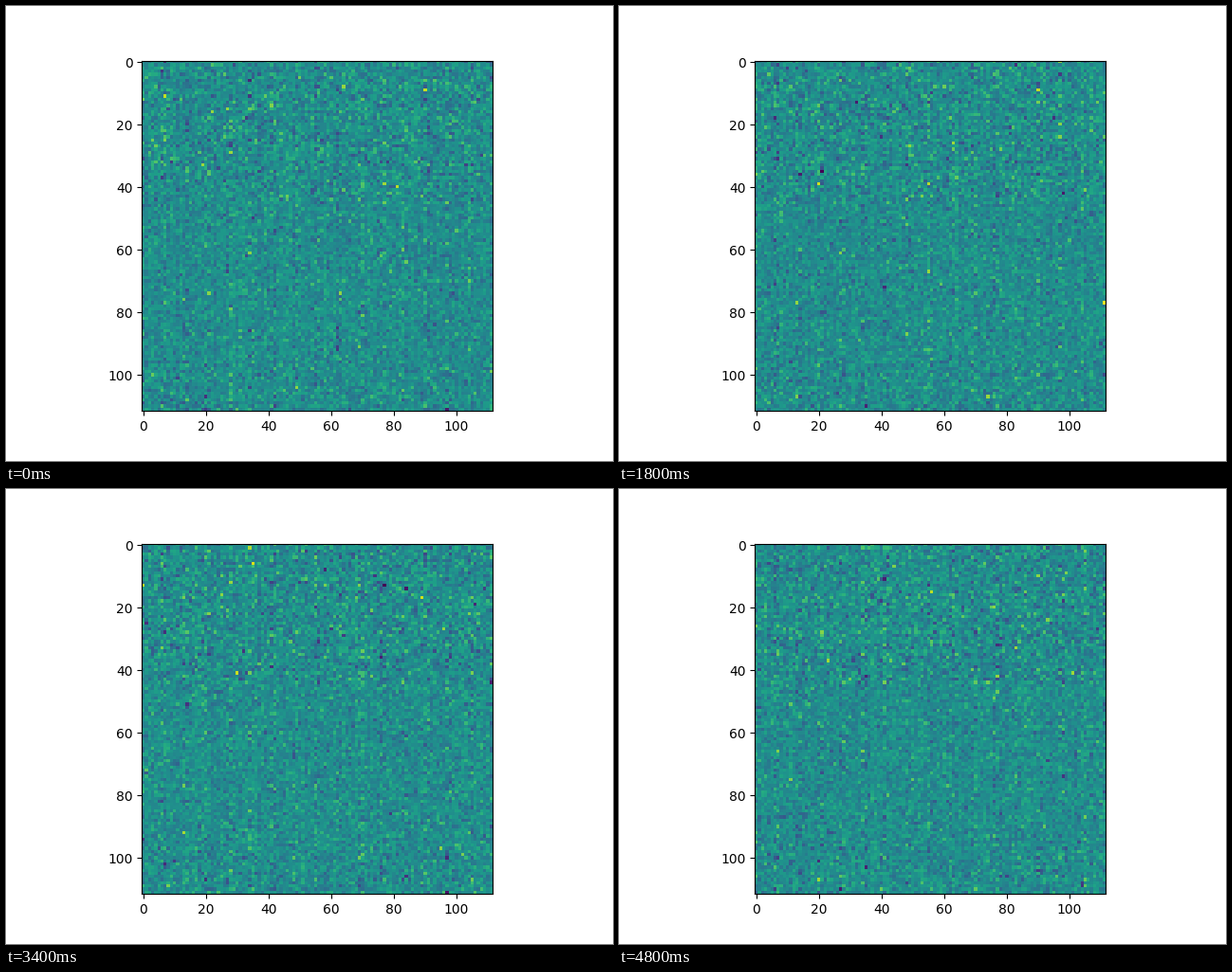
A matplotlib script for the animation above (4.9 s loop, 640x480 px).

```python
import numpy as np
import matplotlib.pyplot as plt
from matplotlib.animation import FuncAnimation

SIZE = 112
FRAMES = 49
INTERVAL = 100
MEAN = 0.49


def noise_scale():
    """Spread of each cell: stronger near the top and on every seventh column."""
    rng = np.random.default_rng(7)
    idx = np.arange(SIZE)
    rows = np.where(idx < 45, 1.17, 0.92)
    rows[idx >= 96] = 1.02
    cols = np.where(np.isin(idx % 7, (0, 6)), 1.27, 0.95)
    cells = rng.lognormal(0, 0.22, (SIZE, SIZE))
    return 0.074 * rows[:, None] * cols * cells


SCALE = noise_scale()


def field(i):
    rng = np.random.default_rng(1000 + i)
    streaks = rng.normal(0, 0.014, SIZE)
    grid = MEAN + streaks + SCALE * rng.normal(size=(SIZE, SIZE))
    return np.clip(grid, 0, 1)


fig, ax = plt.subplots(figsize=(6.4, 4.8), dpi=100)
image = ax.imshow(field(0), cmap="viridis", vmin=0, vmax=1,
                  interpolation="nearest")


def update(i):
    image.set_data(field(i))
    return [image]


anim = FuncAnimation(fig, update, frames=FRAMES, interval=INTERVAL,
                     repeat=True, repeat_delay=0)
plt.show()
```
